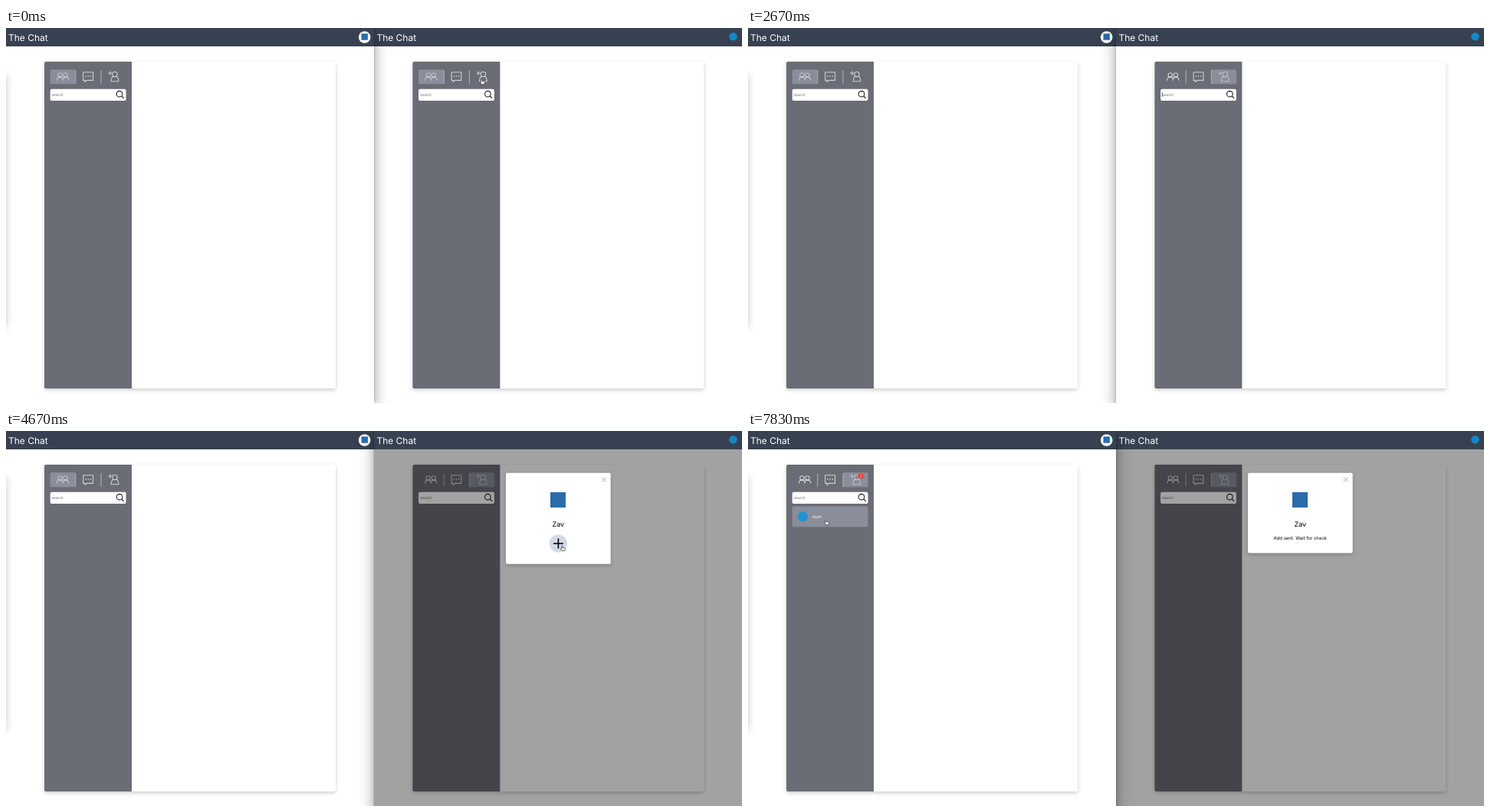
Recreate the animation shown at these times as an HTML page. Size 960x490 px, loop 8 s.

```html
<!DOCTYPE html>
<html lang="en">
<head>
<meta charset="utf-8">
<title>The Chat</title>
<style>
  html, body { margin: 0; width: 100%; height: 100%; overflow: hidden; background: #fff; }
  #stage { position: relative; width: 960px; height: 490px; overflow: hidden; }
  .win { position: absolute; top: 0; width: 480px; height: 490px; background: #fff; box-shadow: 0 0 1px rgba(0,0,0,.45); }
  .win.active { z-index: 2; box-shadow: 0 0 1px rgba(0,0,0,.6), 0 8px 17px rgba(0,0,0,.42); }
  #right { left: 480px; }
  #edge { position: absolute; z-index: 3; left: -20px; top: 58px; width: 19px; height: 330px; box-shadow: 0 3px 11px rgba(0,0,0,.27); }
  svg { position: absolute; left: 0; top: 0; overflow: hidden; }
  #pointer { z-index: 4; }
  text { font-family: Inter, "Noto Sans", sans-serif; text-rendering: geometricPrecision; }
  .cjk { font-family: "Noto Sans CJK TC", "Noto Sans CJK SC", "Noto Sans CJK", sans-serif; }
  .field { font-family: "Liberation Sans", Arial, sans-serif; font-size: 5px; }
  .card { filter: drop-shadow(0 2px 2.5px rgba(0,0,0,.2)); }
  .tab rect { fill: none; }
  .tab .icon { fill: none; stroke: #fff; stroke-opacity: .67; stroke-width: 1.1; stroke-linecap: round; stroke-linejoin: round; }
  .tab.on > rect { fill: #8a8d9a; }
  .tab.on .icon { stroke-opacity: .45; }
</style>
</head>
<body>
<div id="stage">
  <div class="win" id="left"></div>
  <div class="win" id="right"></div>
  <div id="edge"></div>
  <svg id="pointer" width="960" height="490">
    <g id="hand">
      <path d="M-.8 .3q.8-.9 1.5 0v2.1l2.5.6q.9.3.7 1.3l-.5 2.4h-3.5l-2-2.5q-.2-1 1.3-.3z" fill="#eee" stroke="#222" stroke-width=".6"/>
    </g>
    <path id="arrow" d="M0 0v6.2l1.5-1.4 1 2.2 1-.5-1-2.1h2z" fill="#111" stroke="#fff" stroke-width=".5"/>
    <path id="beam" d="M-1.2-3q1.2 0 1.2.8V2.2q0 .8-1.2.8M1.2-3Q0-3 0-2.2M1.2 3Q0 3 0 2.2" fill="none" stroke="#111" stroke-width=".7"/>
  </svg>
</div>
<script>
const $ = id => document.getElementById(id);
const text = (x, y, size, str, extra = '') =>
  `<text x="${x}" y="${y}" font-size="${size}" ${extra}>${str}</text>`;
const cross = (x, y, r, color, width) =>
  `<path d="M${x - r} ${y - r}l${2 * r} ${2 * r}m0 ${-2 * r}l${-2 * r} ${2 * r}" stroke="${color}" stroke-width="${width}"/>`;

const icons = {
  people: `<circle cx="70.4" cy="61.4" r="2.7"/><circle cx="77.5" cy="61.4" r="2.7"/>
    <path d="M66.3 68.3q0-4.2 4.1-4.2 3.5 0 3.6 4.2 0-4.2 3.5-4.2 4.1 0 4.1 4.2"/>`,
  chat: `<path d="M100.7 57.8h12.8v10.6h-8.3l-2.1 2.1v-2.1h-2.4z"/>
    <path d="M103.9 63h.1m3.1 0h.1m3.1 0h.1" stroke-width="1.7"/>`,
  add: `<circle cx="142" cy="60.4" r="3.2"/><path d="M139.9 63.2q-2.7 1.3-2.8 6.6h9.8q-.1-5.3-2.8-6.6M133.6 59h4.4m-2.2-2.2v4.4"/>`
};
const tab = (side, name, x) => `<g class="tab" id="${side}-${name}">
  <rect x="${x}" y="54.3" width="33" height="19" rx="1.6"/><g class="icon">${icons[name]}</g></g>`;

function chatWindow(side, dx, avatar, inside, over) {
  $(side).innerHTML = `<svg width="480" height="490">
    <rect width="480" height="24" fill="#374151"/>
    ${text(3 + dx, 16.8, 12, 'The Chat', 'fill="#fff"')}${avatar}
    <g transform="translate(${dx} 0)">
      <rect class="card" x="50" y="44" width="380" height="427" rx="2" fill="#fff"/>
      <path d="M164 44v427H52q-2 0-2-2V46q0-2 2-2z" fill="#6a6d76"/>
      ${tab(side, 'people', 57.7)}${tab(side, 'chat', 90.7)}${tab(side, 'add', 123.8)}
      <path d="M90.8 55v18M124 55v18" stroke="#b0b2b7"/>
      <rect x="57.7" y="79.7" width="98.8" height="15.2" rx="2" fill="#fff"/>
      <text class="field" id="${side}-field" x="59.5" y="88.8">search</text>
      <g fill="none" stroke="#16181c" stroke-width="1.1"><circle cx="148" cy="86.2" r="3.8"/><path d="M150.8 89l2.9 2.9"/></g>
      ${inside}
    </g>${over}</svg>`;
}

chatWindow('left', 0,
  `<circle cx="467.7" cy="12" r="7.8" fill="#fff"/><rect x="463.5" y="7.3" width="8.4" height="8.4" fill="#2b6cab"/>`,
  `<g id="badge"><rect x="143.4" y="55.4" width="8" height="6.6" rx="3.2" fill="#ef4444"/>
    ${text(147.3, 60.5, 4.5, '1', 'fill="#fff" text-anchor="middle"')}</g>
  <g id="request"><rect id="row" x="57.7" y="98.5" width="98.8" height="26.8" rx="2" fill="#8a8d9a"/>
    <circle cx="71.5" cy="111.8" r="6.8" fill="#2292d2"/>${text(84, 114, 6, 'vum', 'fill="#fff"')}</g>`, '');

const saved = ['pale moor', '200715', '青禾的', '晚霜竹影', 'tenor', '13 rea'];
const savedRows = saved.map((s, i) =>
  text(62.6, 115.8 + i * 13.07, 4.5, s, `fill="#fff" font-weight="500" ${s > '~' ? 'class="cjk"' : ''}`)).join('');

chatWindow('right', .4,
  `<circle cx="468.5" cy="11.3" r="5.3" fill="#1488c6"/>`,
  `<path id="caret" d="M59.8 84.2v5.8" stroke="#111" stroke-width=".6"/>
  <g id="clear">${cross(136.4, 87.3, 1.5, '#1c6396', .8)}</g>
  <g id="menu"><rect class="card" x="57.3" y="94.5" width="122" height="93.3" rx="1.2" fill="#4a4a4a"/>
    ${text(63.6, 103, 4.2, '已儲存資料', 'fill="#bbb" class="cjk"')}
    ${cross(173.5, 101.2, 1.4, '#bbb', .6)}${savedRows}</g>`,
  `<g id="dialog"><rect y="24" width="480" height="466" fill="#000" fill-opacity=".365"/>
    <rect class="card" id="sheet" x="172" y="54.7" width="136.7" rx="2" fill="#fff"/>
    ${cross(299.7, 63.8, 2.9, '#999', .8)}
    ${text(240.3, 125, 9, 'Zav', 'text-anchor="middle"')}
    <rect id="logo" x="230" y="80" width="20" height="20" fill="#2b6cab"/>
    <g id="plus"><circle cx="240.4" cy="147" r="11.5" fill="#d5d8e7"/>
      <path d="M233.9 147h13M240.4 140.5v13" stroke="#000" stroke-width="1.6"/></g>
    ${text(240.3, 142.2, 6, 'Add sent. Wait for check', 'id="sent" text-anchor="middle"')}
  </g>`);

// Pointer moves: [first step, last step, from, to]
const moves = [
  [7, 10, [620.5, 67], [597, 90.5]],
  [23, 28, [597, 90.5], [725.5, 149.8]],
  [33, 40, [725.5, 149.8], [140.8, 66.8]],
  [41, 47, [140.8, 66.8], [101.8, 116]]
];
function pointerAt(k) {
  let pos = moves[0][2];
  for (const [a, b, from, to] of moves) {
    if (k < a) break;
    const p = Math.min(1, (k - a) / (b - a)), e = p * p * (3 - 2 * p);
    pos = from.map((v, i) => v + (to[i] - v) * e);
  }
  return pos;
}

const show = (id, on) => { $(id).style.display = on ? '' : 'none'; };
const within = (k, a, b) => k >= a && k < b;

function draw(t) {
  const k = Math.floor((t + 4) * 6 / 1000);   // six steps a second
  const rightActive = within(k, 2, 39);
  $('left').classList.toggle('active', !rightActive);
  $('right').classList.toggle('active', rightActive);

  const choose = (side, added) => {
    $(side + '-people').classList.toggle('on', !added);
    $(side + '-add').classList.toggle('on', added);
  };
  choose('left', k >= 41);
  choose('right', k >= 8);

  const typed = k < 22 ? 'Zav'.slice(0, Math.max(0, k - 17)) : '';
  $('right-field').textContent = typed || 'search';
  for (const side of ['left', 'right'])
    $(side + '-field').setAttribute('fill', side === 'right' && typed ? '#111' : '#757575');
  show('caret', within(k, 9, 12) || within(k, 15, 18) || within(k, 22, 25));
  show('clear', typed);
  show('menu', within(k, 10, 16));

  show('dialog', k >= 22);
  show('logo', k >= 23);
  show('plus', within(k, 23, 32));
  show('sent', k >= 32);
  $('sheet').setAttribute('height', k < 32 ? 119 : 104.7);

  const [x, y] = pointerAt(k);
  show('badge', k >= 34);
  show('request', k >= 41);
  show('row', k >= 41 && y > 98);

  const overTab = y < 74 && (x < 157 || within(x, 604, 637));
  const overRow = k >= 41 && y > 98;
  const overPlus = within(k, 23, 32) && Math.hypot(x - 720.4, y - 147) < 11.5;
  const inField = x < 637 && x > 538 && within(y, 80, 95);
  const kind = within(k, 16, 24) ? '' :
    overTab || overRow || overPlus ? 'hand' : inField && k < 22 ? 'beam' : 'arrow';
  for (const id of ['hand', 'arrow', 'beam']) {
    show(id, id === kind);
    $(id).setAttribute('transform', `translate(${x} ${y})`);
  }
}

const start = performance.now();
function tick() {
  draw((performance.now() - start) % 8000);
  requestAnimationFrame(tick);
}
tick();
</script>
</body>
</html>
```
